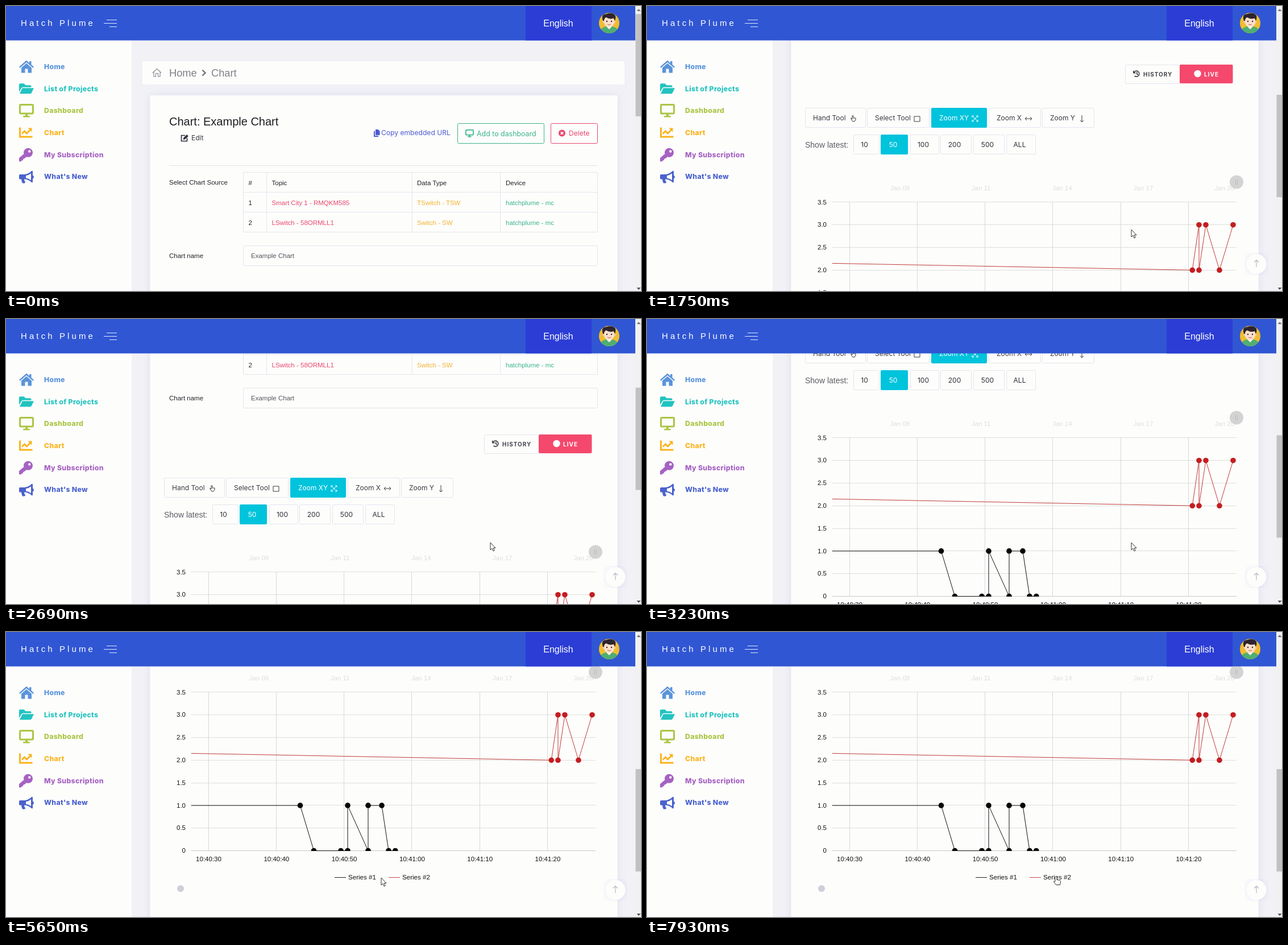
An HTML page for the animation above (8 s loop, 1117 px wide and 501 px high).

```html
<!DOCTYPE html>
<html lang="en">
<head>
<meta charset="utf-8">
<title>Chart page</title>
<style>
html, body { margin: 0; width: 100%; height: 100%; overflow: hidden; background: #fdfdfc; }
svg { display: block; width: 1117px; height: 501px; }
text { white-space: pre; }
.a { font-family: "Liberation Sans", Arial, sans-serif; }
.i { font-family: Inter, sans-serif; }
</style>
</head>
<body>
<svg id="stage" viewBox="0 0 1117 501" xmlns="http://www.w3.org/2000/svg"></svg>
<script>
const LOOP = 8000, STEP = 134.4;
const WHITE = '#fdfdfc', INK = '#232327', LINE = '#e5e5ee';
const RED = '#e9486c', GREEN = '#3cb48d', AMBER = '#f2b233', INDIGO = '#4f5bd0', CYAN = '#00c3dc';

const rect = (x, y, w, h, fill, more = '') =>
  `<rect x="${x}" y="${y}" width="${w}" height="${h}" fill="${fill}" ${more}/>`;
const path = (d, fill, more = '') => `<path d="${d}" fill="${fill}" ${more}/>`;
const stroke = (d, color, w = 1, more = '') =>
  path(d, 'none', `stroke="${color}" stroke-width="${w}" ${more}`);
const dot = (x, y, r, fill, more = '') => `<circle cx="${x}" cy="${y}" r="${r}" fill="${fill}" ${more}/>`;
// Text placed by its vertical centre.
const text = (x, cy, str, size, fill, font = 'a', more = '') =>
  `<text class="${font}" x="${x}" y="${(cy + size * 0.36).toFixed(1)}" font-size="${size}" fill="${fill}" ${more}>${str}</text>`;
const box = (x, y, w, h, color = LINE, fill = 'none') =>
  rect(x + .5, y + .5, w, h, fill, `rx="2" stroke="${color}"`);
const at = (x, y, s) => `<g transform="translate(${x} ${y})">${s}</g>`;
const MID = 'text-anchor="middle"', END = 'text-anchor="end"';

const monitor = (c, k = 1) => `<g transform="scale(${k})">` +
  rect(1.5, 1.5, 23, 15.5, 'none', `rx="1.5" stroke="${c}" stroke-width="3"`) +
  rect(11, 17, 4, 5, c) + rect(7, 21, 12, 2.6, c, 'rx="1"') + '</g>';

function header() {
  return rect(0, 0, 1107, 60.5, '#3056d3') + rect(914, 0, 116, 60.5, '#2b3dd5') +
    text(26, 30, 'Hatch Plume', 15, '#fff', 'a', 'letter-spacing="4.1"') +
    stroke('M177 24.5H195M172 30.5H195M182 36.5H195', '#dfe6ff', 1.2) +
    text(971.5, 30, 'English', 16, '#fff', 'a', MID) + avatar();
}

function avatar() {
  return '<clipPath id="face"><circle cx="1061" cy="30" r="18"/></clipPath><g clip-path="url(#face)">' +
    rect(1043, 12, 36, 36, '#f0bd2c') +
    path('M1043 49Q1045 38 1055 36H1067Q1077 38 1079 49Z', '#4fae72') +
    path('M1056 36H1066L1061 41Z', '#f7f3ea') +
    dot(1051.5, 28, 2.3, '#f3c3a4') + dot(1070.5, 28, 2.3, '#f3c3a4') +
    rect(1052, 18, 18, 18.5, '#fbe0cb', 'rx="8"') +
    path('M1050 26Q1046 14 1056 14Q1067 10 1072 17Q1073 22 1071 26L1069 21.5Q1061 24 1056 20Q1052 21 1052 26Z', '#2d2430') +
    dot(1057, 27, 1.2, '#2d2430') + dot(1065, 27, 1.2, '#2d2430') +
    stroke('M1058 32Q1061 34.5 1064 32', '#b5524a') + '</g>';
}

function sidebar() {
  const items = [
    ['Home', '#5b94da', c =>
      path('M0 11.5L13 0L18 4.4V1.5H21.5V7.4L26 11.5L24.4 13.3L13 3.4L1.6 13.3Z', c) +
      path('M4 13L13 5.3L22 13V22H15.5V15H10.5V22H4Z', c)],
    ['List of Projects', '#22c3bf', c =>
      path('M0 17V4Q0 2 2 2H8.5L11.5 5H19.5Q21.5 5 21.5 7V8.5H7Q5 8.5 4 10.3Z', c) +
      path('M5.8 10H26L22 18.4Q21.4 20 19.5 20H1Z', c)],
    ['Dashboard', '#aac544', c => at(0, -1, monitor(c))],
    ['Chart', '#fbb31a', c =>
      stroke('M1.5 2V18.5H23.5', c, 3) + stroke('M5 13L9.5 8.5L13.5 12.5L19.5 6.5', c, 2.8) +
      path('M15.5 3H22.5V10Z', c)],
    ['My Subscription', '#a562c2', c =>
      stroke('M11 12L2 20.5', c, 5) + path('M0 17L8 10L13 15L9 18H7V21H4V23H0Z', c) +
      dot(16, 7.5, 8, c) + dot(18.3, 5.2, 2.2, WHITE)],
    ["What's New", '#4a62cd', c =>
      path('M0 9Q0 7 2 7H10Q17 6 22 1Q24 0 24 2V8.5Q26 9.5 26 11.5T24 14.5V20Q24 22 22 21Q17 16 10 15.5H2Q0 15.5 0 14ZM12 9.2V13.4Q17 14.2 21 17.2V5.2Q17 8.5 12 9.2Z', c, 'fill-rule="evenodd"') +
      path('M4 15H9Q8.6 18 11 20.5Q11 22.5 9 22.5H6Q4 19 4 15Z', c)]
  ];
  return rect(0, 60, 221, 441, WHITE) + items.map(([name, c, icon], n) => {
    const y = 106.5 + 38.7 * n;
    return at(23, y - 11, icon(c)) +
      text(67, y, name, 12.3, c, 'i', 'font-weight="800" letter-spacing=".3"');
  }).join('');
}

function topOfPage() {
  let s = rect(239, 96, 850, 43, WHITE, 'stroke="#e9e9f4"') +
    stroke('M258 117.5L265.5 110.5L273 117.5M260 116V124H263.5V118.5H267.5V124H271V116', '#85858c', 1.1) +
    text(287, 117.5, 'Home', 18.3, '#808086') +
    stroke('M345.5 112.5L350.5 117.5L345.5 122.5', '#707078', 2.4) +
    text(361, 117.5, 'Chart', 18.3, '#808086');
  s += rect(253.5, 157, 822, 1500, WHITE, 'filter="url(#soft)"');
  s += text(287, 202.5, 'Chart: Example Chart', 20, '#1d1d22') +
    stroke('M315 227.5H308.5V237.5H318.5V232', '#2d2d3a', 1.6) +
    path('M311.5 235L312.3 231.7L318 226L320.8 228.8L315 234.3Z', '#2d2d3a') +
    text(326, 232, 'Edit', 12, '#3a3a42', 'i') +
    path('M647 220H649V228H655V230H647Z', INDIGO) +
    path('M650 217H654.5L657.5 220V227H650Z', INDIGO) +
    text(660, 223, 'Copy embedded URL', 12.1, INDIGO, 'i') +
    box(794, 206, 152, 35, GREEN) + at(808, 217, monitor(GREEN, .57)) +
    text(828, 224, 'Add to dashboard', 12.4, GREEN, 'i') +
    box(958, 206, 82, 35, RED) + dot(978, 223.5, 6, RED) +
    stroke('M975.8 221.3L980.2 225.7M980.2 221.3L975.8 225.7', '#fff', 1.7) +
    text(990, 224, 'Delete', 12.1, RED, 'i') +
    stroke('M287 280.5H1040', '#e2e2ea') + text(287, 310, 'Select Chart Source', 11.5, INK);

  s += stroke('M417.5 293V398M458.5 293V398M714.5 293V398M869.5 293V398M1040.5 293V398' +
    'M417 292.5H1041M417 327.5H1041M417 362.5H1041M417 397.5H1041', LINE);
  const rows = [
    ['#', 'Topic', 'Data Type', 'Device'],
    ['1', 'Smart City 1 - RMQKM585', 'TSwitch - TSW', 'hatchplume - mc'],
    ['2', 'LSwitch - 58ORMLL1', 'Switch - SW', 'hatchplume - mc']
  ];
  const xs = [426.5, 467.5, 723, 879], tint = [INK, RED, AMBER, GREEN];
  rows.forEach((row, r) => row.forEach((cell, c) => {
    s += text(xs[c], 310.5 + 35 * r, cell, 11.5, r ? tint[c] : INK);
  }));
  return s + text(287, 438.5, 'Chart name', 11.5, INK) + box(417, 421, 623, 35) +
    text(431, 438.5, 'Example Chart', 11.5, '#55555c');
}

function controls() {
  const bold = 'font-weight="700" letter-spacing="1"';
  let s = box(841, 503, 96, 33) +
    stroke('M857 516A5 5 0 1 1 857.5 522.8M861.8 516V519.5L864 521', '#44444c', 1.6) +
    path('M855 513V518.5H860.5Z', '#44444c') +
    text(873, 520, 'HISTORY', 10, '#44444c', 'i', bold) +
    rect(937, 503, 93.5, 33, '#f4496d', 'rx="2"') + dot(968.5, 519, 6.2, '#fff') +
    text(980, 520, 'LIVE', 10, '#fff', 'i', bold);

  const button = (x, w, y, on) => on ? rect(x, y, w, 35, CYAN, 'rx="2"') : box(x, y, w, 34);
  const tools = [
    ['Hand Tool', 278, 106, 'M-4 1V-1L-2 1V-5H0V-1H4V2L2 5H-1Z'],
    ['Select Tool', 387, 109, 'M-5 -4H5V5H-5Z'],
    ['Zoom XY', 500, 98, 'M-5 -5L5 5M5 -5L-5 5M-5 -2V-5H-2M5 -2V-5H2M-5 2V5H-2M5 2V5H2'],
    ['Zoom X', 601, 91, 'M-6 0H6M-3 -3L-6 0L-3 3M3 -3L6 0L3 3'],
    ['Zoom Y', 695, 91, 'M0 -6V6M-3 3L0 6L3 3']
  ];
  tools.forEach(([name, x, w, d], n) => {
    const c = n === 2 ? '#fff' : '#3a3a40';
    s += button(x, w, 579, n === 2) + text(x + 14, 597, name, 12, c, 'i') +
      at(x + w - 21, 598, stroke(d, c));
  });
  s += text(278, 643.5, 'Show latest:', 14, '#5c5c64');
  const sizes = [['10', 363, 45], ['50', 411, 48], ['100', 463, 50], ['200', 516, 54], ['500', 574, 54], ['ALL', 632, 51]];
  sizes.forEach(([name, x, w], n) => {
    s += button(x, w, 626, n === 1) +
      text(x + w / 2 - (n ? 2 : 3), 643.5, name, 12, n === 1 ? '#fff' : '#2d2d34', 'i', MID);
  });
  return s;
}

function chart() {
  const left = 325.5, right = 1037, base = 1023, unit = 79.6;
  const y = v => base - v * unit;
  let s = '';
  ['Jan 08', 'Jan 11', 'Jan 14', 'Jan 17', 'Jan 20'].forEach((d, n) => {
    s += text(445 + 142.7 * n, 720, d, 11.5, '#dededf', 'a', MID);
  });
  s += dot(1037, 709.5, 12, '#d3d3d3') + stroke('M1035.5 705V714M1038.5 705V714', '#bdbdbd');
  for (let n = 0; n < 8; n++) {
    const v = n / 2, row = Math.round(y(v)) + .5;
    s += stroke(`M${left} ${row}H${right}`, n ? '#dededa' : '#c9c9c4') +
      text(316, y(v), n ? v.toFixed(1) : '0', 11.5, '#111', 'a', END);
  }
  ['10:40:30', '10:40:40', '10:40:50', '10:41:00', '10:41:10', '10:41:20'].forEach((t, n) => {
    const x = 356 + 119.3 * n;
    s += stroke(`M${Math.floor(x) + .5} ${y(3.5)}V${base}`, '#d9d9db') +
      text(x + .5, 1037.5, t, 11.5, '#111', 'a', MID);
  });
  const series = (pts, c, line) =>
    stroke('M' + pts.map(([x, v]) => `${x} ${y(v) + .5}`).join('L'), line, 1) +
    pts.slice(1).map(([x, v]) => dot(x, y(v) + .5, 4.8, c)).join('');
  s += `<clipPath id="plot">${rect(left, 740, 720, base - 739, '#000')}</clipPath><g clip-path="url(#plot)">` +
    series([[left, 2.15], [959.3, 2], [971, 3], [971, 2], [983, 3], [1007, 2], [1031, 3]], '#c41d20', '#bd3b38') +
    series([[left, 1], [517.5, 1], [541.5, 0], [589, 0], [601, 0], [601, 1], [637, 0], [637, 1], [661, 1], [673, 0], [684.8, 0]], '#050505', '#111') + '</g>';
  return s + stroke('M578 1070.5H598', '#222') + text(602, 1069.5, 'Series #1', 11.6, '#111') +
    stroke('M673 1070.5H693', '#c8474a') + text(697, 1069.5, 'Series #2', 11.6, '#111') +
    dot(307, 1090, 6, '#cfcfdc');
}

const stage = document.getElementById('stage');
stage.innerHTML =
  '<defs><filter id="soft" x="-10%" y="-5%" width="120%" height="110%">' +
  '<feDropShadow dx="0" dy="0" stdDeviation="7" flood-color="#8a8ad8" flood-opacity=".18"/></filter></defs>' +
  rect(0, 0, 1117, 501, '#f1f1f6') +
  `<g id="page">${topOfPage() + controls() + chart()}</g>` + sidebar() +
  `<g id="toTop">${dot(1072, 453.5, 17.5, WHITE, 'filter="url(#soft)"') +
    stroke('M1072 459V446.5M1068 450.5L1072 446.5L1076 450.5', '#b4b4ba', 1.1)}</g>` +
  header() + rect(1107, 0, 10, 501, '#f1f1f1') +
  path('M1109.5 9L1113 5L1116.5 9Z', '#777') + path('M1109.5 495L1113 499L1116.5 495Z', '#555') +
  rect(1107.5, 14, 9.5, 180, '#c1c1c1', 'id="thumb"') +
  `<g id="cursor">
    <g id="arrow">${path('M0 0V13L3 10.2L5 15L7.2 14L5.2 9.5H9Z', '#fff', 'stroke="#333"')}</g>
    <g id="hand">${path('M-1.5 1Q0 -1 1.5 1V6L6 7Q8.5 7.5 8 10L7 15H0L-4 9.5Q-4 7.5 -1.5 9Z', '#fff', 'stroke="#333"')}</g>
  </g>`;

const [page, toTop, thumb, cursor, arrow, hand] =
  ['page', 'toTop', 'thumb', 'cursor', 'arrow', 'hand'].map(id => document.getElementById(id));

// Keys: [step, value, ...]
const SCROLL = [[0, 0], [7, 0], [8, 20], [9, 81], [10, 190], [12, 390], [13, 400], [14, 270], [15, 100], [16, 6],
  [17, 25], [18, 100], [21, 400], [22, 475], [23, 520], [24, 536], [25, 590], [26, 630], [27, 639]];
const POINTER = [[3, 1100, 470], [8, 852, 393], [27, 852, 393], [31, 630, 429], [40, 630, 429],
  [42, 660, 432], [46, 660, 432], [50, 719.5, 429.5]];

function sample(keys, t) {
  const n = keys.findIndex(k => k[0] > t);
  if (n < 0) return keys[keys.length - 1].slice(1);
  if (n === 0) return keys[0].slice(1);
  const a = keys[n - 1], b = keys[n], p = (t - a[0]) / (b[0] - a[0]);
  return a.slice(1).map((v, i) => v + (b[i + 1] - v) * p);
}

const show = (el, on) => el.setAttribute('visibility', on ? 'visible' : 'hidden');

function draw(now) {
  const step = Math.floor((now % LOOP + 6) / STEP);
  const scroll = Math.round(sample(SCROLL, step)[0]);
  const [x, y] = sample(POINTER, step);
  page.setAttribute('transform', `translate(0 ${-scroll})`);
  thumb.setAttribute('y', 14 + scroll / 2.815);
  show(toTop, scroll > 100);
  cursor.setAttribute('transform', `translate(${x} ${y})`);
  const seen = step >= 3;
  const link = y > 422 && y < 440 && ((x > 602 && x < 651) || (x > 697 && x < 746));
  show(arrow, seen && !link);
  show(hand, seen && link);
}

const start = performance.now();
function tick() {
  draw(performance.now() - start);
  requestAnimationFrame(tick);
}
tick();
</script>
</body>
</html>
```
